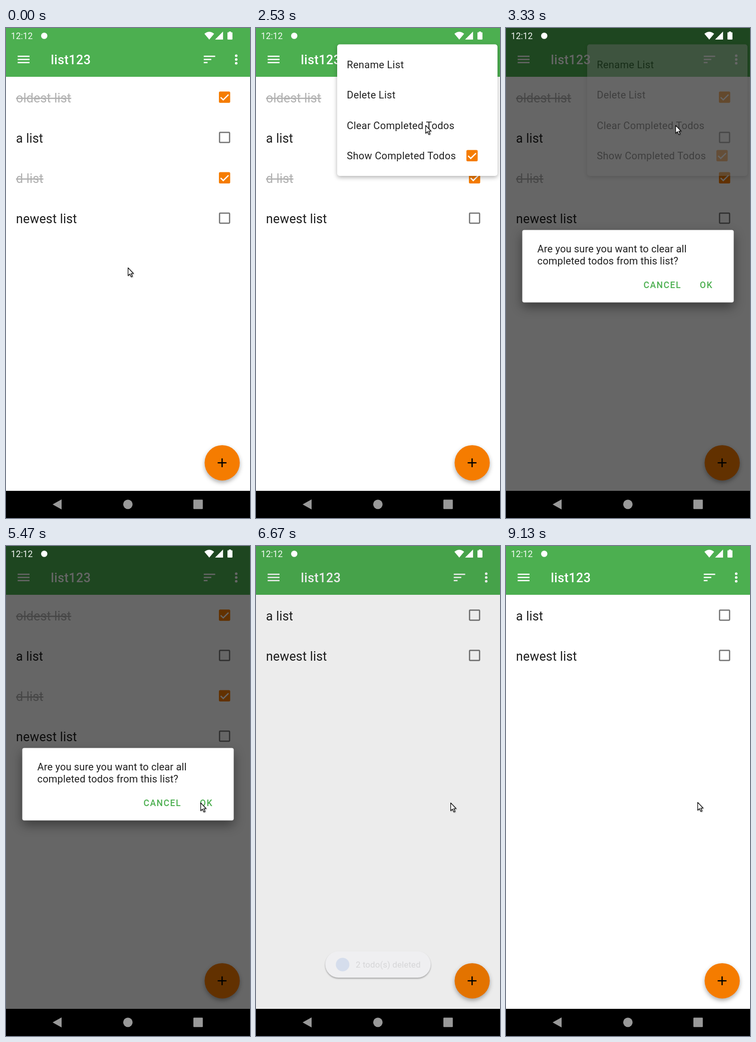
Recreate the animation shown at these times as an HTML page. Size 487 by 974 pixels, loop 9190 ms.

```html
<!DOCTYPE html>
<html lang="en">
<head>
<meta charset="utf-8">
<title>Todo list</title>
<style>
  html, body { margin: 0; width: 100%; height: 100%; overflow: hidden; background: #fff; }
  svg { display: block; width: 487px; height: 974px; font-family: Roboto, sans-serif; }
  text { white-space: pre; }
  .item { font-size: 25px; letter-spacing: .18px; fill: #1d1d1d; }
  .done { fill: #b0b0b0; text-decoration: line-through; }
  .entry { font-size: 20px; letter-spacing: .32px; fill: #1f1f1f; }
  .message { font-size: 20px; letter-spacing: .16px; fill: #1f1f1f; }
  .button { font-size: 17.5px; font-weight: 500; letter-spacing: 1.56px; fill: #4caf50; }
  #fab { filter: drop-shadow(0 4px 4px rgba(0,0,0,.32)); }
  #menu { filter: drop-shadow(0 3px 4px rgba(0,0,0,.3)); }
  #dialog .card { filter: drop-shadow(0 9px 11px rgba(0,0,0,.42)); }
  #pill { filter: drop-shadow(0 2px 1.5px rgba(0,0,0,.32)); }
  #cursor { filter: drop-shadow(1px 1.5px 1px rgba(0,0,0,.35)); }
</style>
</head>
<body>
<svg viewBox="0 0 487 974">
  <defs>
    <clipPath id="reveal"><rect id="revealBox"/></clipPath>
    <g id="off"><rect x="-10" y="-10" width="20" height="20" rx="1.2" fill="none" stroke="#757575" stroke-width="2.5"/></g>
    <g id="on">
      <rect x="-11.25" y="-11.25" width="22.5" height="22.5" rx="2.5" fill="#f57c00"/>
      <path d="M-7.8 .4L-2.6 5.4L7.9 -5" fill="none" stroke="#fff" stroke-width="2.5"/>
    </g>
  </defs>

  <rect width="487" height="974" fill="#fff"/>
  <rect width="487" height="97" fill="#4caf50"/>
  <g fill="#fff">
    <path d="M23.3 55h23.7v2.5h-23.7zM23.3 61.3h23.7v2.5h-23.7zM23.3 67.6h23.7v2.5h-23.7z"/>
    <path d="M394.7 55h22.8v2.5h-22.8zM394.7 61.2h15v2.5h-15zM394.7 67.5h7.6v2.5h-7.6z"/>
    <circle cx="459.5" cy="55" r="2.6"/><circle cx="459.5" cy="62.5" r="2.6"/><circle cx="459.5" cy="70" r="2.6"/>
    <text x="89.5" y="72" font-size="25" font-weight="500" letter-spacing=".45">list123</text>
  </g>

  <g id="before"></g>
  <g id="after"></g>

  <g id="fab">
    <circle cx="431.5" cy="864.3" r="35.1" fill="#f57c00"/>
    <path d="M422.5 864.3h17.6M431.3 855.5v17.6" stroke="#000" stroke-width="2.5"/>
  </g>

  <g id="menuClip">
    <g id="menu">
      <rect x="162" y="32.5" width="320" height="261.5" rx="5" fill="#fff"/>
      <text class="entry" x="181.3" y="80">Rename List</text>
      <text class="entry" x="181.3" y="140.4">Delete List</text>
      <text class="entry" x="181.3" y="200.9">Clear Completed Todos</text>
      <text class="entry" x="181.3" y="261.3">Show Completed Todos</text>
      <use href="#on" x="431.2" y="253.8"/>
    </g>
  </g>

  <rect id="dim" width="487" height="920" fill="#000"/>

  <g fill="#fff">
    <text x="9.8" y="22.2" font-size="17.5" fill-opacity=".94">12:12</text>
    <circle cx="76.3" cy="15.5" r="6.3"/>
    <path d="M405.7 23L396 11.6Q405.7 3.2 415.4 11.6ZM433.2 7V23H417.2Z"/>
    <path d="M445 8.5V7h4v1.5h1.7q1.3 0 1.3 1.3V21.7q0 1.3-1.3 1.3h-7.4q-1.3 0-1.3-1.3V9.8q0-1.3 1.3-1.3z"/>
  </g>

  <g id="dialog">
    <rect class="card" x="32.5" y="401.5" width="422" height="144" rx="4" fill="#fff"/>
    <text class="message" x="62.6" y="445.7">Are you sure you want to clear all</text>
    <text class="message" x="62.6" y="469.6">completed todos from this list?</text>
    <text class="button" x="274.4" y="517">CANCEL</text>
    <text class="button" x="386.8" y="517">OK</text>
  </g>

  <g id="toast">
    <rect id="pill" x="134.5" y="804.5" width="218" height="54.5" rx="27.2" fill="#f0f0f2"/>
    <g id="toastContent">
      <circle cx="170.3" cy="832" r="14" fill="#1a5fd0"/>
      <text x="197.4" y="838.7" font-size="17.5" letter-spacing=".1" fill="#1f1f1f">2 todo(s) deleted</text>
    </g>
  </g>

  <rect y="920" width="487" height="54" fill="#000"/>
  <g fill="#999">
    <path d="M93 947L111 937V957Z"/>
    <circle cx="243.3" cy="946.8" r="9.4"/>
    <rect x="374" y="937.5" width="18.8" height="18.8" rx="1.2"/>
  </g>

  <path id="cursor" d="M.6 .6V16.2L4.2 12.9L6.9 18.8L9.3 17.7L6.7 12H11.4Z" fill="#fff" stroke="#000" stroke-width="1.2" stroke-linejoin="round"/>
</svg>
<script>
const LOOP = 9190, STEP = 1000 / 15;
const el = id => document.getElementById(id);
const ramp = (t, from, to) => Math.min(1, Math.max(0, (t - from) / (to - from)));
const ease = u => u * u * (3 - 2 * u);

// Each move: start time, end time, destination of the pointer tip.
const home = [243, 476];
const moves = [
  [600, 1333, 459, 54],
  [2067, 2533, 338, 193],
  [3635, 4200, 373, 503],
  [4600, 5000, 383, 506],
  [5200, 5467, 388, 510],
  [7467, 7667, 382, 509]
];

function fillList(id, items) {
  el(id).innerHTML = items.map(([label, done], i) => {
    const y = 80.2 * i;
    return `<text class="item ${done ? "done" : ""}" x="20" y="${147.5 + y}">${label}</text>` +
      `<use href="#${done ? "on" : "off"}" x="436.2" y="${137.4 + y}"/>`;
  }).join("");
}
fillList("before", [["oldest list", true], ["a list"], ["d list", true], ["newest list"]]);
fillList("after", [["a list"], ["newest list"]]);

function fade(id, opacity) {
  el(id).style.display = opacity > 0 ? "" : "none";
  el(id).setAttribute("opacity", opacity);
}

function scaleAround(id, x, y, s) {
  el(id).setAttribute("transform", `translate(${x} ${y}) scale(${s}) translate(${-x} ${-y})`);
}

function pointer(t) {
  let [x, y] = home;
  for (const [from, to, toX, toY] of moves) {
    const u = ease(ramp(t, from, to));
    x += (toX - x) * u;
    y += (toY - y) * u;
  }
  return [x, y];
}

function drawMenu(t) {
  const open = ramp(t, 1540, 1800);
  fade("menuClip", Math.min(1, open * 1.4) * (1 - ramp(t, 3200, 3440)));
  const grow = 1 - (1 - open) ** 2, box = el("revealBox");
  const left = 459 - 314 * grow, bottom = 63 + 257 * grow;
  box.setAttribute("x", left);
  box.setAttribute("y", 20);
  box.setAttribute("width", 487 - left);
  box.setAttribute("height", bottom - 20);
  if (open < 1) el("menuClip").setAttribute("clip-path", "url(#reveal)");
  else el("menuClip").removeAttribute("clip-path");
}

function drawDialog(t) {
  const shown = ramp(t, 3150, 3320);
  const card = shown * (1 - ramp(t, 6530, 6660));
  fade("dim", .6 * shown * (1 - ramp(t, 6560, 6682)));
  fade("dialog", card);
  scaleAround("dialog", 243.5, 473.5, .9 + .1 * card);
}

function drawToast(t) {
  const shown = ramp(t, 6630, 6930) * (1 - ramp(t, 8867, 9130));
  fade("toast", Math.min(1, shown * 8));
  fade("toastContent", shown);
  scaleAround("toast", 243.5, 832, .96 + .04 * shown);
}

function render(ms) {
  const t = Math.floor((ms % LOOP + 4) / STEP) * STEP;
  const cleared = t >= 6599;
  fade("before", cleared ? 0 : 1);
  fade("after", cleared ? 1 : 0);
  drawMenu(t);
  drawDialog(t);
  drawToast(t);
  el("cursor").setAttribute("transform", `translate(${pointer(t)})`);
}

const start = performance.now();
function tick() {
  render(performance.now() - start);
  requestAnimationFrame(tick);
}
tick();
</script>
</body>
</html>
```
